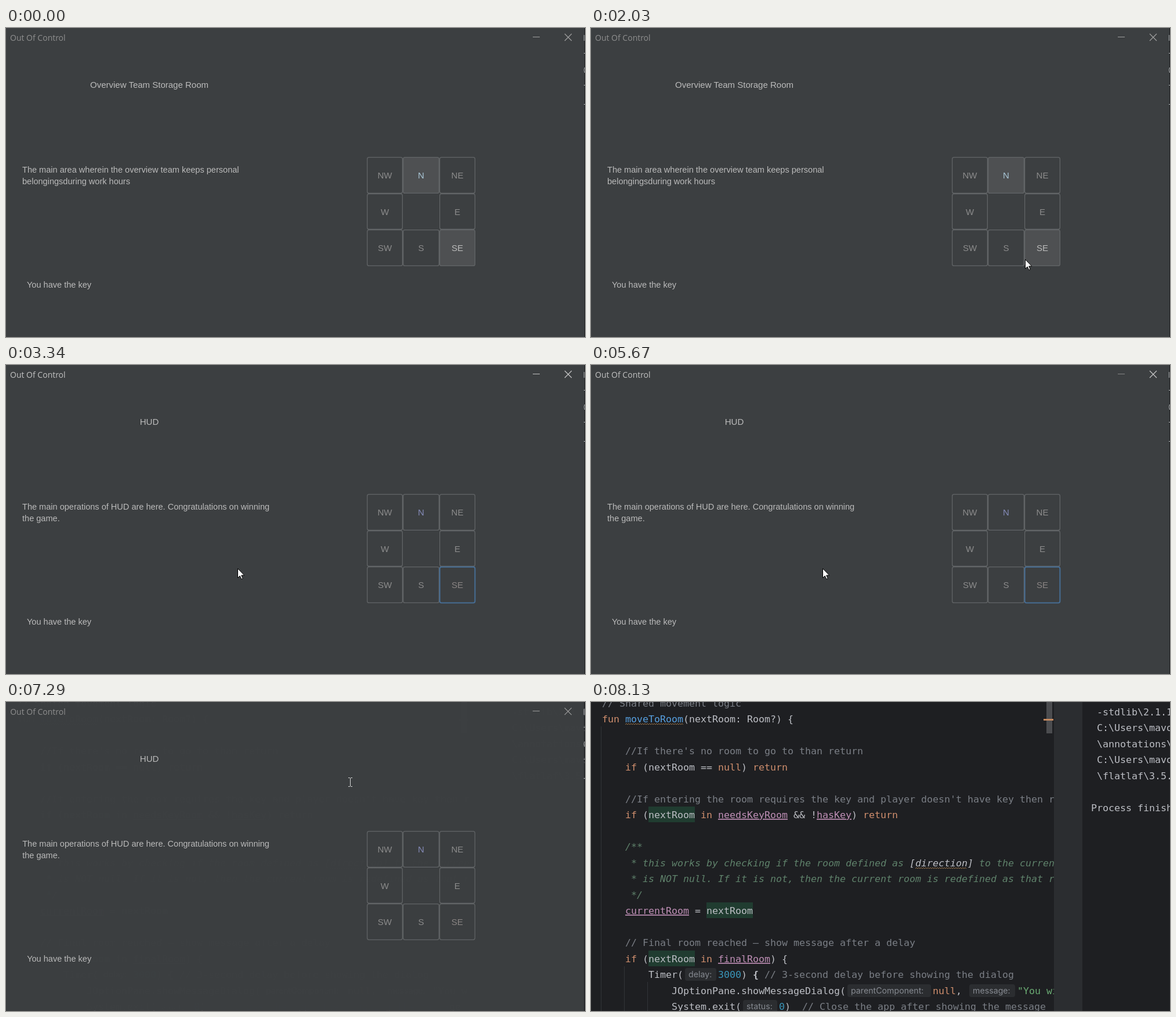
Animation, 998 px wide and 532 px high, one loop 8.27 s. Source, as an HTML page:

```html
<!DOCTYPE html>
<html lang="en">
<head>
<meta charset="utf-8">
<title>Out Of Control</title>
<style>
  html, body { margin: 0; width: 100%; height: 100%; overflow: hidden; background: #1e1f22; }
  svg { display: block; width: 998px; height: 532px; }
  text { white-space: pre; }
  .mono { font: 16.61px "DejaVu Sans Mono", monospace; fill: #bcbec4; }
  .hint { font: 14.2px Inter, sans-serif; fill: #868a91; }
  .ui { font: 14.55px "Liberation Sans", Arial, sans-serif; fill: #bbb; }
  .big { font-size: 15px; text-anchor: middle; }
  .title { font: 14px "Open Sans", sans-serif; }
  .kw { fill: #cf8e6d; } .fn { fill: #57a0e0; } .num { fill: #3a96ba; } .str { fill: #6aab73; }
  .com { fill: #7a7e85; } .doc { fill: #5f826b; font-style: italic; }
  .ref { fill: #bcbec4; font-style: italic; }
  .prop { fill: #bf8fb6; text-decoration: underline 1px; text-underline-offset: 2px; }
  .bold { font-weight: bold; }
</style>
</head>
<body>
<svg viewBox="0 0 998 532">
  <defs>
    <clipPath id="codeClip"><rect width="798" height="532"/></clipPath>
  </defs>
  <rect width="998" height="532" fill="#1e1f22"/>
  <g id="code" clip-path="url(#codeClip)"></g>
  <rect x="785" width="10" height="54" fill="#4b4c4f"/>
  <rect x="780" y="29" width="17" height="3" fill="#c4895f"/>
  <rect x="798" width="49" height="532" fill="#2b2d30"/>
  <g id="console"></g>

  <g id="game">
    <rect width="997" height="532" fill="#3c3f41"/>
    <rect x="997" width="1" height="532" fill="#191a1c"/>
    <path d="M996.5 12v10M996 43.5h2M997.5 68q-2 4 0 9M996 98.5h2M996 131.5h2" stroke="#b5b8ba" fill="none"/>
    <text id="caption" class="title" x="7" y="22">Out Of Control</text>
    <path id="minimize" d="M908 15.5h12" fill="none"/>
    <path id="close" d="M963 10l12 12m0-12l-12 12" fill="none" stroke-width="1.2"/>
    <text id="room" class="ui big" x="247" y="103"></text>
    <text id="line1" class="ui" x="28" y="249"></text>
    <text id="line2" class="ui" x="28" y="269"></text>
    <text class="ui" x="36" y="447">You have the key</text>
    <g id="compass"></g>
  </g>

  <g id="dialog">
    <rect x="326.5" y="11.5" width="326" height="150" fill="#3c3f41" stroke="#55585a"/>
    <text class="title" x="337" y="34" fill="#bbb">Message</text>
    <path d="M626 24l11 11m0-11l-11 11" stroke="#bbb" fill="none"/>
    <circle cx="361" cy="80" r="17" fill="#3592c4"/>
    <path d="M361 70v4m0 4v12" stroke="#3c3f41" stroke-width="4"/>
    <text class="ui" x="396" y="85">You win! Thanks for playing.</text>
    <rect x="548.5" y="118.5" width="90" height="28" rx="3" fill="#365880" stroke="#4c708c"/>
    <text class="ui big" x="593" y="138">OK</text>
  </g>

  <path id="arrow" d="M.5.5v16l3.7-3.5 2.6 5.6 2.4-1-2.5-5.5h5z" fill="#fff" stroke="#000"/>
  <path id="beam" d="M590 130.5h2.5l1 1 1-1h2.5M593.5 131v14M590 145.5h2.5l1-1 1 1h2.5" fill="none" stroke="#d8d8d8"/>
</svg>
<script>
const LOOP = 8270, CLICK = 2510, WIN = 5670, EXIT = 7290;
const el = id => document.getElementById(id);
const clamp = v => Math.max(0, Math.min(1, v));
const ramp = (t, from, to) => clamp((t - from) / (to - from));
const escape = s => s.replace(/&/g, "&amp;").replace(/</g, "&lt;");

// Editor: one text per row; tokens are "class~text" or plain text.
const rowY = row => Math.floor(8 + 27.5 * row);
const row = (n, x, ...tokens) => {
  const spans = tokens.map(token => {
    const [, cls, body] = token.match(/^(?:(\w+)~)?(.*)$/);
    return `<tspan class="${cls || ""}">${escape(body)}</tspan>`;
  });
  return `<text class="mono" x="${x}" y="${rowY(n)}">${spans.join("")}</text>`;
};
const mark = (n, x) => `<rect x="${x}" y="${rowY(n) - 20}" width="80" height="27" fill="#203c30"/>`;
const hint = (n, x, width, label) =>
  `<rect x="${x}" y="${rowY(n) - 17}" width="${width}" height="22" rx="4" fill="#2b2d30"/>
   <text class="hint" x="${x + 6}" y="${rowY(n) - 1}">${label}</text>`;
const wave = (n, x, width) =>
  `<path d="M${x} ${rowY(n) + 4}${"l2-2 2 2".repeat(width / 4)}" fill="none" stroke="#a37a4c" stroke-width=".9"/>`;
const guide = (x, y) => `<path d="M${x}.5 ${y}V532" stroke="#313438"/>`;

el("code").innerHTML = [
  guide(17, 42), guide(57, 455), guide(97, 482),
  mark(7, 99), mark(13, 199), mark(16, 99),
  row(0, 19, "com~// Shared movement logic"),
  row(1, 19, "kw~fun ", "fn~moveToRoom", "(nextRoom: Room?) {"), wave(1, 59, 100),
  row(3, 59, "com~//If there's no room to go to than return"),
  row(4, 59, "kw~if ", "(nextRoom == ", "kw~null", ") ", "kw~return"),
  row(6, 59, "com~//If entering the room requires the key and player doesn't have key then return"),
  row(7, 59, "kw~if ", "(nextRoom ", "kw~in ", "prop~needsKeyRoom", " && !", "prop~hasKey", ") ", "kw~return"),
  row(9, 59, "doc~/**"),
  row(10, 59, "doc~ * this works by checking if the room defined as ", "ref~[direction]", "doc~ to the current"),
  wave(10, 559, 90),
  row(11, 59, "doc~ * is NOT null. If it is not, then the current room is redefined as that room"),
  row(12, 59, "doc~ */"),
  row(13, 59, "prop~currentRoom", " = nextRoom"),
  row(15, 59, "com~// Final room reached – show message after a delay"),
  row(16, 59, "kw~if ", "(nextRoom ", "kw~in ", "prop~finalRoom", ") {"),
  row(17, 99, "Timer("), hint(17, 162, 54, "delay:"),
  row(17, 219, "num~3000", ") ", "bold~{", "com~ // 3-second delay before showing the dialog"),
  row(18, 139, "JOptionPane.showMessageDialog("), hint(18, 442, 144, "parentComponent:"),
  row(18, 589, "kw~null", ","), hint(18, 652, 79, "message:"), row(18, 735, 'str~"You win!'),
  row(19, 139, "System.exit("), hint(19, 262, 59, "status:"),
  row(19, 324, "num~0", ")  ", "com~// Close the app after showing the message")
].join("");

const output = ["-stdlib\\2.1.1", "C:\\Users\\mavo", "\\annotations\\", "C:\\Users\\mavo", "\\flatlaf\\3.5."];
el("console").innerHTML = output.map((line, i) =>
  `<text class="mono" x="872" y="${Math.floor(23 + 27.5 * i)}">${line}</text>`).join("") +
  '<text id="finished" class="mono" x="862" y="188">Process finished</text>';

// Compass buttons on whole pixels; the centre cell stays empty.
const buttons = {};
const edge = (origin, i) => Math.floor(origin + 62.5 * i);
["NW", "N", "NE", "W", "", "E", "SW", "S", "SE"].forEach((name, i) => {
  if (!name) return;
  const col = i % 3, line = Math.floor(i / 3);
  const x = edge(622, col), y = edge(222.5, line);
  const width = edge(622, col + 1) - x, height = edge(222.5, line + 1) - y;
  const group = document.createElementNS("http://www.w3.org/2000/svg", "g");
  group.innerHTML = `<rect x="${x + .625}" y="${y + .625}" width="${width - 1.25}" height="${height - 1.25}" rx="3"/>
    <text class="ui big" x="${x + width / 2}" y="${y + 37}">${name}</text>`;
  el("compass").append(group);
  buttons[name] = group;
});
function paintButton(name, ink, fill = "none", stroke = "#626567", width = 1.25) {
  const [box, label] = buttons[name].children;
  box.setAttribute("fill", fill);
  box.setAttribute("stroke", stroke);
  box.setAttribute("stroke-width", width);
  label.style.fill = ink;
}
Object.keys(buttons).forEach(name => paintButton(name, "#8c8c8c"));

// Pointer moves: start, end, number of steps, points spread evenly over them.
const moves = [
  [200, 960, 12, [[552, 345], [500, 341], [400, 350], [280, 358], [190, 365], [148, 374],
    [70, 395], [25, 440], [22, 490], [40, 511], [63, 456], [120, 455]]],
  [1030, 1840, 13, [[158, 420], [140, 385], [80, 372], [25, 400], [18, 450], [60, 490],
    [150, 496], [260, 490], [390, 480], [500, 468], [590, 456], [655, 448], [694, 444]]],
  [1900, 2310, 7, [[712, 430], [730, 414], [748, 398], [760, 389], [769, 384], [774, 382], [776, 382]]],
  [3070, 3340, 5, [[735, 376], [620, 366], [490, 356], [420, 351], [399, 350]]],
  [6370, 7180, 12, [[405, 344], [470, 270], [560, 165], [593, 138], [593, 138]]]
];
function pointerAt(t) {
  const move = moves.findLast(m => t >= m[0]);
  if (!move) return null;
  const [start, end, steps, points] = move;
  const step = Math.floor(ramp(t, start, end) * (steps - 1) + 0.15);
  const place = Math.min(1, step / (steps - 1)) * (points.length - 1);
  const i = Math.min(Math.floor(place), points.length - 2);
  return points[i].map((v, axis) => v + (points[i + 1][axis] - v) * (place - i));
}

const show = (id, visible) => el(id).style.display = visible ? "" : "none";

function draw(t) {
  const won = t >= CLICK;
  const active = won && t < WIN + 100;

  el("room").textContent = won ? "HUD" : "Overview Team Storage Room";
  el("line1").textContent = won
    ? "The main operations of HUD are here. Congratulations on winning"
    : "The main area wherein the overview team keeps personal";
  el("line2").textContent = won ? "the game." : "belongingsduring work hours";

  el("caption").style.fill = active ? "#c2c2c2" : "#8f8f8f";
  el("minimize").style.stroke = t >= WIN && active ? "#858585" : active ? "#c2c2c2" : "#a0a0a0";
  el("close").style.stroke = active ? "#c8c8c8" : "#a0a0a0";

  if (won) {
    paintButton("N", "#858bb8");
    if (active) paintButton("SE", "#8a8584", "none", "#466d94", 2);
    else paintButton("SE", "#8a8584");
  } else {
    paintButton("N", "#a9c6d6", "#4e5052");
    paintButton("SE", "#bbb", t >= 2100 ? "#55585a" : "#4e5052");
  }

  el("dialog").style.opacity = ramp(t, WIN + 100, 5940) * (1 - ramp(t, 7060, 7180));

  const leave = ramp(t, EXIT, EXIT + 230);
  const scale = 1 - 0.1 * leave;
  el("game").style.opacity = 1 - leave;
  el("game").setAttribute("transform", `translate(499 266) scale(${scale}) translate(-499 -266)`);
  show("finished", t >= 8130);

  const pointer = pointerAt(t);
  show("arrow", pointer && t < 7180);
  show("beam", t >= 7180 && t < 7600);
  if (pointer) el("arrow").setAttribute("transform", `translate(${pointer})`);
}

const began = performance.now();
function tick() {
  draw((performance.now() - began) % LOOP);
  requestAnimationFrame(tick);
}
tick();
</script>
</body>
</html>
```
